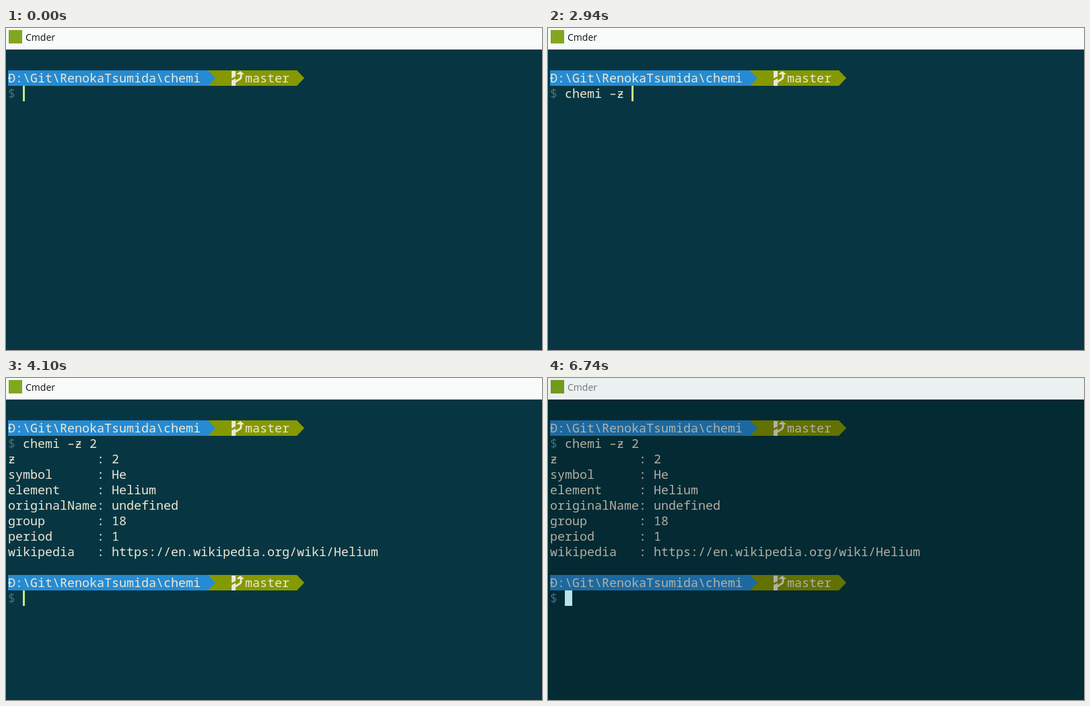
An HTML page for the animation above (6.84 s loop, 796x479 px).

```html
<!DOCTYPE html>
<html lang="en">
<head>
<meta charset="utf-8">
<title>Terminal</title>
<style>
  html, body { margin: 0; width: 100%; height: 100%; overflow: hidden; }
  svg {
    display: block;
    --bg: #073642; --bar: #f8fbfa; --title: #111; --icon: #82a71f;
    --path: #268bd2; --branch: #859900; --text: #eee8d5;
    --sign: #506d70; --cursor: #c3e88d;
    background: var(--bg);
  }
  svg.dim {
    --bg: #042a33; --bar: #ebf0f1; --title: #777; --icon: #739a1c;
    --path: #1b69a0; --branch: #627100; --text: #b2b0a4;
    --sign: #38708a; --cursor: #b9e3e8;
  }
  text { font: 18.333px "Noto Sans Mono", monospace; fill: var(--text); white-space: pre; }
  .title { font: 14px "Open Sans", sans-serif; fill: var(--title); }
  .sign { fill: var(--sign); }
</style>
</head>
<body>
<svg id="stage" width="796" height="479" viewBox="0 0 796 479">
  <defs>
    <g id="prompt">
      <path d="M300 0h132l11 11.5l-11 11.5h-132z" fill="var(--branch)"/>
      <path d="M3 0h297l11 11.5l-11 11.5h-297z" fill="var(--path)"/>
      <text x="3" y="18">Đ:\Git\RenokaTsumida\chemi</text>
      <path d="M335 1h6v8l-6 3zM335 15l6-3v11h-6z" fill="var(--text)"/>
      <path d="M339 18l8-5q2-1 2-4v-4" fill="none" stroke="var(--text)" stroke-width="3"/>
      <path d="M342 6l6-5l6 5z" fill="var(--text)"/>
      <text x="355" y="18">master</text>
    </g>
  </defs>
  <rect width="796" height="32" fill="var(--bar)"/>
  <rect x="4" y="3" width="20" height="20" fill="var(--icon)"/>
  <text class="title" x="29" y="19">Cmder</text>
  <use href="#prompt" y="63"/>
  <text class="sign" x="3" y="104">$</text>
  <text id="command" x="25" y="104"></text>
  <g id="output"></g>
  <use id="nextPrompt" href="#prompt" y="293"/>
  <text id="nextSign" class="sign" x="3" y="334">$</text>
  <rect id="cursor" height="23" fill="var(--cursor)"/>
</svg>
<script>
const LOOP = 6840, CELL = 11, ROW = 23, LEFT = 3, TOP = 63;
const $ = id => document.getElementById(id);
const show = (id, on) => { $(id).style.display = on ? '' : 'none'; };

const keys = [
  [1250, 'c'], [1480, 'h'], [1580, 'e'], [1780, 'm'], [2000, 'i'],
  [2380, ' '], [2740, '–'], [2940, 'ƶ '], [3530, '2']
];
const blinks = [[510, 1070], [3480, 3530], [4640, 5170], [5720, 6230]];
const fields = {
  'ƶ': '2', symbol: 'He', element: 'Helium', originalName: 'undefined',
  group: '18', period: '1', wikipedia: 'https://en.wikipedia.org/wiki/Helium'
};

Object.entries(fields).forEach(([name, value], i) => {
  const line = document.createElementNS('http://www.w3.org/2000/svg', 'text');
  line.setAttribute('x', LEFT);
  line.setAttribute('y', TOP + (i + 2) * ROW + 18);
  line.textContent = name.padEnd(12) + ': ' + value;
  $('output').append(line);
});

// Cursor cell as [column, row]
function cursorCell(t, typed) {
  if (t < 3780) return [2 + typed.length, 1];
  if (t < 4000) return [0, 2];
  if (t < 4050) return [0, 9];
  return [t < 4100 ? 0 : 2, 11];
}

function render(t) {
  const typed = keys.filter(([at]) => t >= at).map(([, ch]) => ch).join('');
  const [col, row] = cursorCell(t, typed);
  const dim = t >= 6740;
  $('command').textContent = typed;
  $('stage').classList.toggle('dim', dim);
  $('cursor').setAttribute('x', LEFT + col * CELL);
  $('cursor').setAttribute('y', TOP + row * ROW);
  $('cursor').setAttribute('width', dim ? CELL : 3);
  show('cursor', !blinks.some(([from, to]) => t >= from && t < to));
  show('output', t >= 4000);
  show('nextPrompt', t >= 4050);
  show('nextSign', t >= 4100);
}

const start = performance.now();
function tick(now) {
  render(Math.max(0, now - start) % LOOP);
  requestAnimationFrame(tick);
}
tick(start);
</script>
</body>
</html>
```
